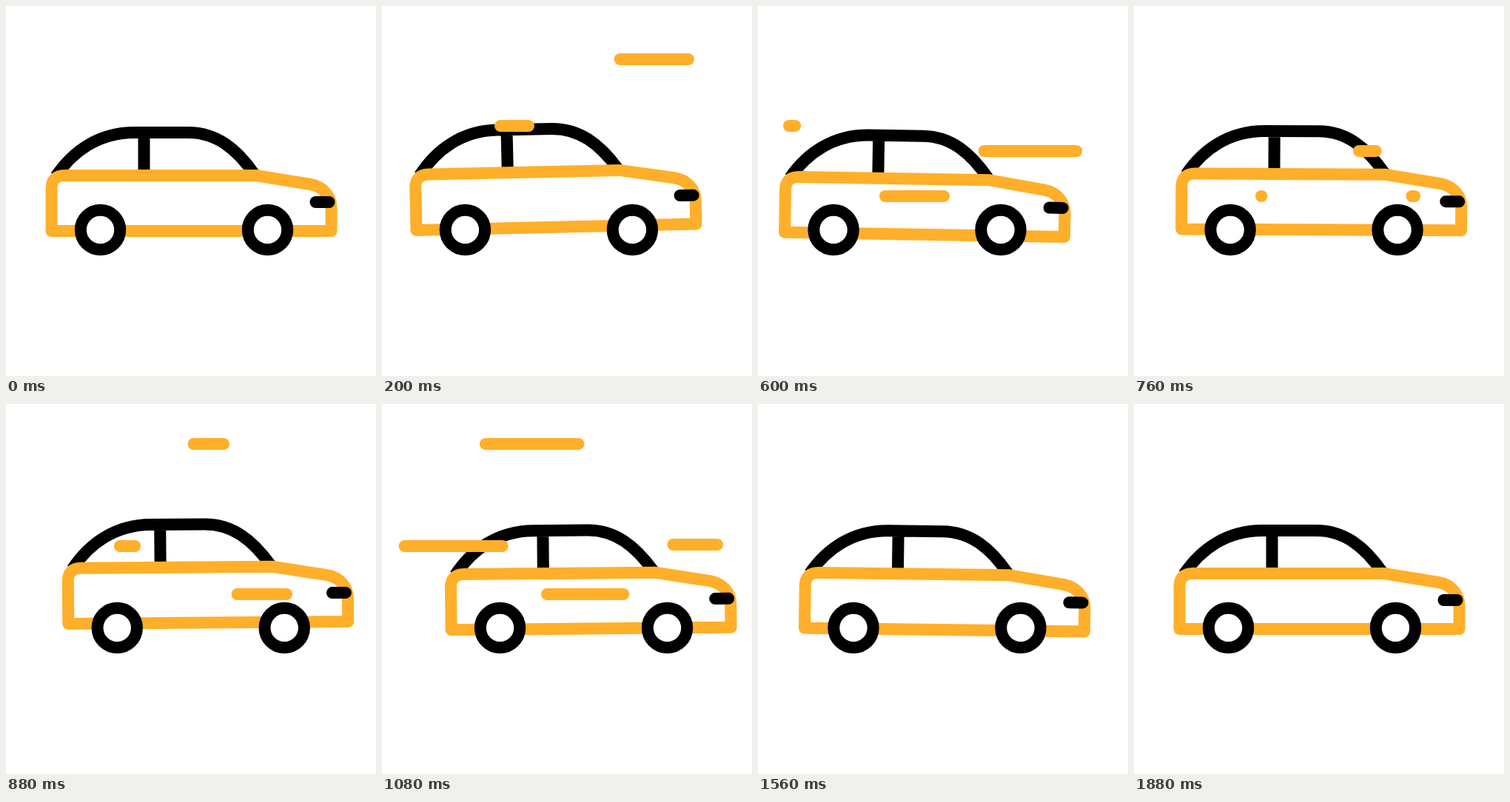
An HTML page for the animation above (2000 ms loop, 500 px wide and 500 px high).

```html
<!DOCTYPE html>
<html lang="en">
<head>
<meta charset="utf-8">
<title>Car</title>
<style>
  html, body { margin: 0; width: 100%; height: 100%; overflow: hidden; background: #fff; }
  svg { display: block; width: 100%; height: 100%; }
  .ink { stroke: #000; }
  .sun { stroke: #ffaf29; }
</style>
</head>
<body>
<svg viewBox="0 0 500 500" fill="none" stroke-width="16" stroke-linejoin="round">
  <g id="car">
    <g id="body">
      <path class="ink" d="M67 230C90 196 125 171 173 171H246C284 171 311 193 335 227M186 171V229"/>
      <path class="sun" d="M61 304V247Q61 229 79 229H337L411 241C428 244 439 257 439 272V304Z"/>
      <path class="ink" stroke-linecap="round" d="M418 265H436"/>
    </g>
    <g class="ink" fill="#fff">
      <circle cx="127" cy="302.5" r="26.7"/>
      <circle cx="353" cy="302.5" r="26.7"/>
    </g>
  </g>
  <g id="streaks" class="sun" stroke-linecap="round"></g>
</svg>
<script>
const LOOP = 2000, STEP = 40;
const TRAVEL = 156, SWEEP = 333, LAG = 220;
const BEAT = 290, FIRST_BEAT = 40;

const car = document.getElementById("car");
const body = document.getElementById("body");
const layer = document.getElementById("streaks");

function ease(u) {
  u = Math.min(1, Math.max(0, u));
  return u * u * (3 - 2 * u);
}

const ramp = (t, from, to) => ease((t - from) / (to - from));

// Back off, surge ahead, settle.
const driveX = t =>
  0.5 - 37 * ramp(t, 0, 456) + 70 * ramp(t, 456, 1015) - 33 * ramp(t, 1015, 1640);

// Glides from one pose to the next, one per beat.
function sway(poses, t) {
  return poses.reduce((value, pose, i) => {
    const start = FIRST_BEAT + (i - 1) * BEAT;
    return value + (pose - (poses[i - 1] || 0)) * ramp(t, start, start + BEAT);
  }, 0);
}

const bounceY = t => sway([0, -9, 5, -9, 4.5, 1.4, 0], t);
const tilt = t => sway([0, -2.2, 1, -0.5, -0.5, 0.85, 0], t);

// A dash whose tail follows its head leftwards.
function streak(start, x, y) {
  const line = document.createElementNS("http://www.w3.org/2000/svg", "path");
  layer.append(line);
  return t => {
    const head = ramp(t, start, start + SWEEP);
    const tail = ramp(t, start + LAG, start + LAG + SWEEP);
    line.setAttribute("d", head > tail ? `M${x - TRAVEL * tail} ${y}H${x - TRAVEL * head}` : "");
  };
}

const streaks = [
  streak(13, 414, 72),
  streak(93, 198, 162),
  streak(215, 328, 257),
  streak(287, 460, 196),
  streak(730, 379, 257),
  streak(769, 294, 54),
  streak(805, 174, 192),
  streak(940, 453, 190)
];

function draw(t) {
  car.setAttribute("transform", `translate(${driveX(t)} 0)`);
  body.setAttribute("transform", `translate(0 ${bounceY(t)}) rotate(${tilt(t)} 250 302)`);
  streaks.forEach(update => update(t));
}

const began = performance.now();
function tick() {
  const t = (performance.now() - began) % LOOP;
  draw(Math.floor(t / STEP) * STEP);
  requestAnimationFrame(tick);
}
tick();
</script>
</body>
</html>
```
